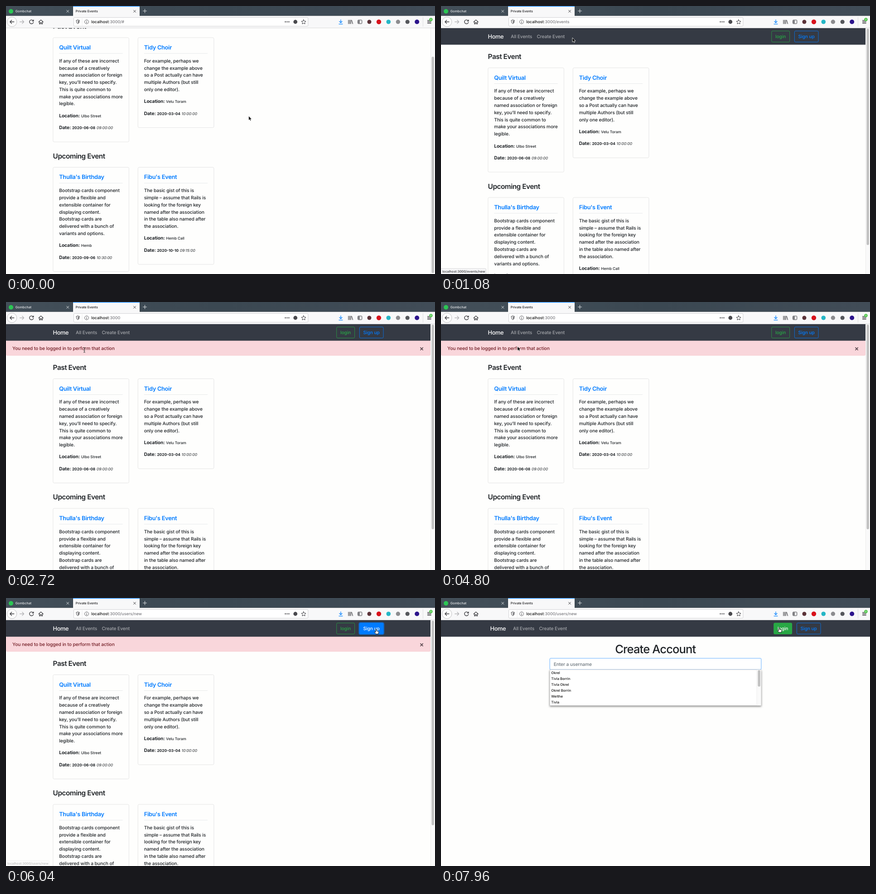
Animation, 947 px wide and 592 px high, one loop 8 s. Source, as an HTML page:

```html
<!DOCTYPE html>
<html lang="en">
<head>
<meta charset="utf-8">
<title>Private Events</title>
<style>
  html, body { margin: 0; width: 100%; height: 100%; overflow: hidden; background: #fefefd; }
  svg { display: block; width: 947px; height: 592px; }
  text { font-family: Inter, Roboto, sans-serif; text-rendering: geometricPrecision; }
  .b { font-weight: 700; }
  .s { font-size: 8.3px; letter-spacing: 0; }
  .i { font-style: italic; }
  .ln { fill: none; stroke: #3c3c40; stroke-width: 1.3; stroke-linecap: round; stroke-linejoin: round; }
</style>
</head>
<body>
<svg id="stage" viewBox="0 0 947 592"></svg>
<script>
const LOOP = 8000;
const INK = '#1d2125', BLUE = '#007bff', GREEN = '#28a745', DARK = '#353a44';

// kind: [size, weight, letter-spacing, fill]
const KINDS = {
  h1: [25.5, 500, -0.85, INK],
  h4: [15.3, 600, -0.45, INK],
  h5: [12.75, 600, -0.26, BLUE],
  body: [10.25, 450, -0.1, INK],
  brand: [12.75, 450, -0.3, '#fff'],
  nav: [10.25, 450, -0.1, '#fff'],
  tab: [7.2, 450, 0, '#1a1a1c'],
  url: [8.85, 450, 0, '#77777c'],
  status: [7.2, 450, 0, '#38383c'],
  item: [7.7, 450, 0, '#111']
};

// y is the middle of the capitals
function text(kind, x, y, str, attrs = '') {
  const [size, weight, gap, fill] = KINDS[kind];
  return `<text x="${x}" y="${y + size * 0.36}" font-size="${size}" font-weight="${weight}"
    letter-spacing="${gap}" fill="${fill}" ${attrs}>${str}</text>`;
}
const rect = (x, y, w, h, fill, attrs = '') =>
  `<rect x="${x}" y="${y}" width="${w}" height="${h}" fill="${fill}" ${attrs}/>`;
const dot = (x, y, r, fill, attrs = '') =>
  `<circle cx="${x}" cy="${y}" r="${r}" fill="${fill}" ${attrs}/>`;
const line = (d, attrs = '') => `<path class="ln" d="${d}" ${attrs}/>`;
const cross = (x, y, r, color, w) =>
  line(`M${x - r} ${y - r}l${2 * r} ${2 * r}m0 ${-2 * r}l${-2 * r} ${2 * r}`, `style="stroke:${color};stroke-width:${w}"`);

function button(id, x, w, color, label) {
  const mid = x + w / 2;
  return rect(x - 1, 54.2, w + 2, 26.4, 'none', `id="${id}Ring" rx="3.4" stroke="${color}" stroke-opacity=".5" stroke-width="2" opacity="0"`) +
    rect(x + 0.35, 55.2, w - 0.7, 24.4, 'none', `rx="2.4" stroke="${color}" stroke-width=".8"`) +
    rect(x, 54.9, w, 25, color, `id="${id}Fill" rx="2.6" opacity="0"`) +
    text('nav', mid, 67.5, label, `id="${id}Text" text-anchor="middle" style="fill:${color}"`);
}

const navbar = () => `<g id="nav">
  ${rect(-10, 48.7, 967, 36.8, DARK)}
  ${text('brand', 103.5, 67.5, 'Home')}
  ${text('nav', 154, 67.5, 'All Events', 'id="all"')}
  ${text('nav', 211.4, 67.5, 'Create Event', 'id="create"')}
  ${button('login', 729.4, 40.6, GREEN, 'login')}
  ${button('sign', 780, 53.4, BLUE, 'Sign up')}</g>`;

function card(x, y, title, body, place, date, time) {
  const rows = body.split('|');
  const left = x + 13.8;
  const last = y + 51.6 + 15.78 * (rows.length - 1);
  return rect(x + 0.4, y + 0.4, 167.6, last + 84 - y, '#fefefd', 'rx="2.6" stroke="#dfdfdf" stroke-width=".8"') +
    text('h5', left, y + 22, title) +
    rect(left, y + 34.9, 140.4, 0.8, '#e2e4e6') +
    rows.map((r, i) => text('body', left, y + 51.6 + 15.78 * i, r)).join('') +
    text('body', left, last + 26.4, `<tspan class="b">Location:</tspan> <tspan class="s">${place}</tspan>`) +
    text('body', left, last + 52.8, `<tspan class="b">Date:</tspan> <tspan class="s b">${date}</tspan> <tspan class="s i">${time}</tspan>`);
}

const list = () => `<g id="list">
  ${text('h4', 103.6, 111.6, 'Past Event')}
  ${card(103.4, 136.2, 'Quilt Virtual', 'If any of these are incorrect|because of a creatively|named association or foreign|key, you’ll need to specify.|This is quite common to|make your associations more|legible.', 'Ulbo Street', '2020-06-08', '09:00:00')}
  ${card(290.9, 136.2, 'Tidy Choir', 'For example, perhaps we|change the example above|so a Post actually can have|multiple Authors (but still|only one editor).', 'Velu Toram', '2020-03-04', '10:00:00')}
  ${text('h4', 103.6, 398, 'Upcoming Event')}
  ${card(103.4, 422.6, "Thulla's Birthday", 'Bootstrap cards component|provide a flexible and|extensible container for|displaying content.|Bootstrap cards are|delivered with a bunch of|variants and options.', 'Hemb', '2020-09-06', '10:30:00')}
  ${card(290.9, 422.6, "Fibu's Event", 'The basic gist of this is|simple – assume that Rails is|looking for the foreign key|named after the association|in the table also named after|the association.', 'Hemb Call', '2020-10-10', '09:15:00')}</g>`;

const alertBar = () => `<g id="alert">
  ${rect(0.3, 85.8, 936.4, 32.3, '#f9d6db', 'rx="2.4" stroke="#f5c6cb" stroke-width=".7"')}
  ${text('body', 14, 102.3, 'You need to be logged in to perform that action', 'style="fill:#721c24"')}
  ${cross(917.6, 103.4, 2.6, '#55434a', 1.7)}</g>`;

const names = ['Okrel', 'Tivla Borrin', 'Tivla Okrel', 'Okrel Borrin', 'Welthe', 'Tivla'];

const form = () => `<g id="form">
  ${text('h1', 473.3, 113, 'Create Account', 'text-anchor="middle"')}
  ${rect(239.2, 132.2, 468.6, 27, '#bfdeff', 'rx="3.4"')}
  ${rect(240.4, 133.4, 466.2, 24.6, '#fff', 'rx="2.4" stroke="#80bdff" stroke-width=".8"')}
  ${text('body', 248.7, 146, 'Enter a username', 'style="fill:#6c757d"')}
  ${rect(248.4, 140, 0.7, 12, '#333', 'id="caret"')}
  ${rect(240, 168.5, 74.5, 25, BLUE, 'rx="2.6"')}
  ${text('body', 277.2, 181.2, 'Create User', 'text-anchor="middle" style="fill:#fff"')}
  <g id="drop">
    ${rect(240, 158.4, 467, 79.2, '#fff', 'style="filter:drop-shadow(0 2px 2px rgba(0,0,0,.5))"')}
    ${rect(240.3, 158.4, 466.4, 79, '#fff', 'stroke="#bdbdbd" stroke-width=".6"')}
    ${rect(697, 158.8, 9.5, 78.3, '#fafafa', 'stroke="#e4e4e4" stroke-width=".6"')}
    ${rect(699.4, 159.4, 5.4, 36.4, '#c1c1c1', 'rx="2.7"')}
    ${names.map((n, i) => text('item', 243.3, 164.8 + 13.15 * i, n)).join('')}
  </g></g>`;

const bar = () => `<g id="bar">
  ${rect(937, 48.7, 10, 544, '#fafafa')}${rect(937, 48.7, 0.7, 544, '#e6e6e6')}
  ${rect(939.5, 50, 5.4, 478, '#c1c1c1', 'id="thumb" rx="2.7"')}</g>`;

const chrome = () => `
  <defs><linearGradient id="strip"><stop stop-color="#434f59"/><stop offset=".5" stop-color="#3b4852"/><stop offset="1" stop-color="#414c57"/></linearGradient></defs>
  ${rect(0, 0, 947, 22, 'url(#strip)')}
  ${rect(0, 21, 947, 1, '#000', 'opacity=".3"')}${rect(147.3, 0, 148.4, 22, '#000', 'opacity=".3"')}
  ${dot(11, 11.8, 5, '#2bc653')}
  ${text('tab', 20.7, 11.8, 'Gombchat', 'style="fill:#e6e8ea"')}
  ${cross(136.3, 11.6, 2.5, '#e0e3e5', 1)}
  ${rect(0, 21.7, 947, 27, '#f8f8f9')}${rect(0, 48, 947, 0.7, '#cfcfd2')}
  ${rect(148, 0, 147, 23, '#f8f8f9')}${rect(148, 0, 147, 1.3, '#0a84ff')}
  ${text('tab', 153.8, 11.9, 'Private Events')}
  ${cross(284, 11.6, 2.5, '#3c3c40', 1)}
  ${line('M302.5 11h8m-4-4v8', 'style="stroke:#e0e3e5;stroke-width:1"')}
  ${dot(13.2, 35, 10.6, '#fdfdfd', 'stroke="#b4b4b7" stroke-width=".8"')}
  ${line('M17.8 35h-9m3.8-3.8l-3.8 3.8 3.8 3.8')}
  ${line('M30.6 35h9m-3.8-3.8l3.8 3.8-3.8 3.8', 'style="stroke:#b5b5b8"')}
  ${line('M60 32.6a4.4 4.4 0 1 0 .6 3.2M60.8 30.6v2.8h-2.8')}
  ${line('M72.2 35.2l4.9-4.6 4.9 4.6M73.7 34.6v5h2.2v-3h2.4v3h2.2v-5')}
  ${rect(149.5, 25.4, 517.3, 19.2, '#fff', 'rx="2" stroke="#c8c8cb" stroke-width=".8"')}
  ${line('M158.6 30.6q2 1 3.6 1 .2 6-3.6 8-3.8-2-3.6-8 1.6 0 3.6-1z', 'style="stroke-width:1"')}
  ${rect(158.6, 32.4, 1.8, 5, '#4a4a4e')}${rect(167.7, 27, 0.7, 16, '#e0e0e2')}
  ${dot(178, 35, 4.4, 'none', 'stroke="#55555a" stroke-width=".9"')}
  ${line('M178 34.8v2.4M178 32.8v.1', 'style="stroke-width:1.1"')}
  ${text('url', 188.3, 35.2, '<tspan fill="#111">localhost</tspan><tspan id="path"></tspan>')}
  ${[616.6, 620.5, 624.4].map(x => dot(x, 35, 1.2, '#3c3c40')).join('')}
  ${dot(638.8, 35, 4.4, '#4a4a4e')}
  ${line('M657 30.2l1.5 3.2 3.5.4-2.6 2.4.7 3.5-3.1-1.8-3.1 1.8.7-3.5-2.6-2.4 3.5-.4z', 'style="stroke-width:1"')}
  ${line('M739 30.4v6.4m-3-2.8l3 3 3-3M735 39.8h8', 'style="stroke:#0a84ff"')}
  ${line('M756 31v8.2M758.6 31v8.2M761.2 31v8.2M763 31.4l2.4 7.8', 'style="stroke-width:1.2"')}
  ${rect(776.7, 31, 9, 8, 'none', 'rx="1.2" stroke="#3c3c40"')}${rect(777.4, 31.6, 3.4, 6.8, '#77777b')}
  ${dot(802, 35, 4.5, '#5b3238')}${dot(823, 35, 5.2, '#d8121c')}${dot(844.3, 35, 4.8, '#25b6c6')}
  ${dot(865.4, 35, 4.7, '#8c8c8f')}${dot(886.2, 35, 4.6, '#55575c')}${dot(907.2, 35, 5, '#2c148c')}
  ${rect(920, 24.5, 0.7, 21, '#d4d4d7')}
  ${line('M930.6 32h7.6m-7.6 3h7.6m-7.6 3h7.6')}
  ${dot(938, 29.8, 3.6, '#3fc13a')}${line('M938 31.4v-3m-1.3 1.2l1.3-1.3 1.3 1.3', 'style="stroke:#fff;stroke-width:.8"')}`;

const overlay = () => `
  <g id="status">${rect(-2, 580, 100, 14, '#f6f6f7', 'id="statusBox" rx="2" stroke="#c8c8cb" stroke-width=".7"')}
  ${text('status', 3, 586.4, '', 'id="statusText"')}</g>
  <g id="cursor">
    <path id="arrow" d="M0 0V9.6L2.2 7.6 3.7 10.9 5.4 10.1 4 7H6.9Z" fill="#000" stroke="#fff" stroke-width=".8"/>
    <path id="hand" d="M-1 .9C-1-.4 1-.4 1 .9V3.8L4.6 4.6C5.7 4.9 5.9 5.6 5.7 6.6L4.9 10.4H-.6L-3.6 6.6C-4.1 5.7-3 5-2.2 5.7L-1 6.8Z" fill="#fff" stroke="#000" stroke-width=".9"/>
    <g id="beam" fill="none"><path d="M0-5V5" stroke="#fff" stroke-width="2" opacity=".6"/>
    <path d="M-2-5.6Q0-5.6 0-4.4Q0-5.6 2-5.6M0-4.6V4.6M-2 5.6Q0 5.6 0 4.4Q0 5.6 2 5.6M-1.4 2H1.4" stroke="#333" stroke-width=".9"/></g>
  </g>`;

document.getElementById('stage').innerHTML =
  `<g id="page">${list()}${alertBar()}${form()}${navbar()}</g>` + bar() + chrome() + overlay();

const $ = id => document.getElementById(id);
const set = (id, attrs) => { for (const k in attrs) $(id).setAttribute(k, attrs[k]); };
const show = (id, on) => { $(id).style.display = on ? '' : 'none'; };
const ramp = (t, start, span) => Math.min(1, Math.max(0, (t - start) / span));
const smooth = u => u * u * (3 - 2 * u);
const latest = (steps, t) => steps.filter(s => s[0] <= t).pop();

// time, x, y, pointer shape
const MOVES = [
  [0, 535.6, 243, 'arrow'], [360, 535.6, 243, 'arrow'], [660, 186, 66, 'hand'], [900, 186, 66, 'hand'],
  [980, 232, 67, 'hand'], [1040, 268, 69, 'arrow'], [1080, 290, 70, 'arrow'], [1160, 296, 70, 'arrow'],
  [1240, 260, 66, 'hand'], [1960, 260, 66, 'hand'], [2040, 250, 84, 'arrow'], [2200, 234, 100, 'beam'],
  [2720, 173, 106, 'beam'], [4799, 173, 106, 'beam'], [4800, 168, 98, 'arrow'], [5200, 500, 108, 'arrow'],
  [5500, 806, 78, 'arrow'], [5560, 817, 69, 'hand'], [6160, 817, 69, 'hand'], [6200, 790, 84, 'arrow'],
  [6440, 439, 158.5, 'arrow'], [6720, 448, 150, 'arrow'], [6800, 449, 146, 'beam'], [6920, 450, 143, 'beam'],
  [7480, 450, 143, 'beam'], [7640, 570, 182, 'arrow'], [7840, 732, 84, 'arrow'], [7900, 746.5, 65.5, 'hand'],
  [LOOP, 746.5, 65.5, 'hand']
];
const PATHS = [[0, '/#'], [820, '/events'], [1480, '/events/new'], [1880, ''], [6000, '/users/new']];
const HINTS = [[0, '/events'], [960, '/events/new'], [5000, '/users/new']];

function pointer(t) {
  const n = MOVES.findIndex(m => m[0] > t);
  const [t0, x0, y0, shape] = MOVES[n - 1], [t1, x1, y1] = MOVES[n];
  const u = (t - t0) / (t1 - t0);
  return { x: x0 + (x1 - x0) * u, y: y0 + (y1 - y0) * u, shape };
}

function fillButton(id, u, color, ring) {
  set(id + 'Fill', { opacity: u });
  set(id + 'Ring', { opacity: ring });
  $(id + 'Text').style.fill = u > 0.5 ? '#fff' : color;
}

function draw(t) {
  const signup = t >= 6200, warned = t >= 1880 && !signup;
  const scroll = 66.7 * (1 - smooth(ramp(t, 80, 260)));
  set('page', { transform: `translate(0 ${-scroll})` });
  set('list', { transform: `translate(0 ${warned ? 32.9 : 0})` });
  set('nav', { transform: `translate(${signup ? 5 : 0} 0)` });
  show('list', !signup);
  show('bar', !signup);
  show('alert', warned);
  show('form', signup);
  set('thumb', { y: 50 + 62 * scroll / 66.7, height: warned ? 452 : 478 });
  show('caret', t >= 6840 && t < 7500);
  set('drop', { opacity: ramp(t, 7100, 120) });

  fillButton('sign', signup ? 0 : ramp(t, 5560, 150), BLUE, !signup && t >= 5960 ? 1 : 0);
  fillButton('login', ramp(t, 7800, 120), GREEN, 0);

  const p = pointer(t);
  const onLink = p.shape === 'hand' && p.x < 280;
  set('all', { 'fill-opacity': onLink && p.x < 206 ? 0.78 : 0.55 });
  set('create', { 'fill-opacity': onLink && p.x > 206 ? 0.78 : 0.55 });
  set('cursor', { transform: `translate(${p.x} ${p.y})` });
  for (const s of ['arrow', 'hand', 'beam']) show(s, s === p.shape);

  $('path').textContent = ':3000' + latest(PATHS, t)[1];
  $('statusText').textContent = 'localhost:3000' + latest(HINTS, t)[1];
  set('statusBox', { width: $('statusText').getComputedTextLength() + 7 });
  const first = ramp(t, 640, 80) - ramp(t, 2240, 120);
  const second = ramp(t, 5560, 80) - ramp(t, 5960, 120);
  set('status', { opacity: Math.max(first, second) });
}

const start = performance.now();
function tick() {
  draw((performance.now() - start) % LOOP);
  requestAnimationFrame(tick);
}
tick();
</script>
</body>
</html>
```
